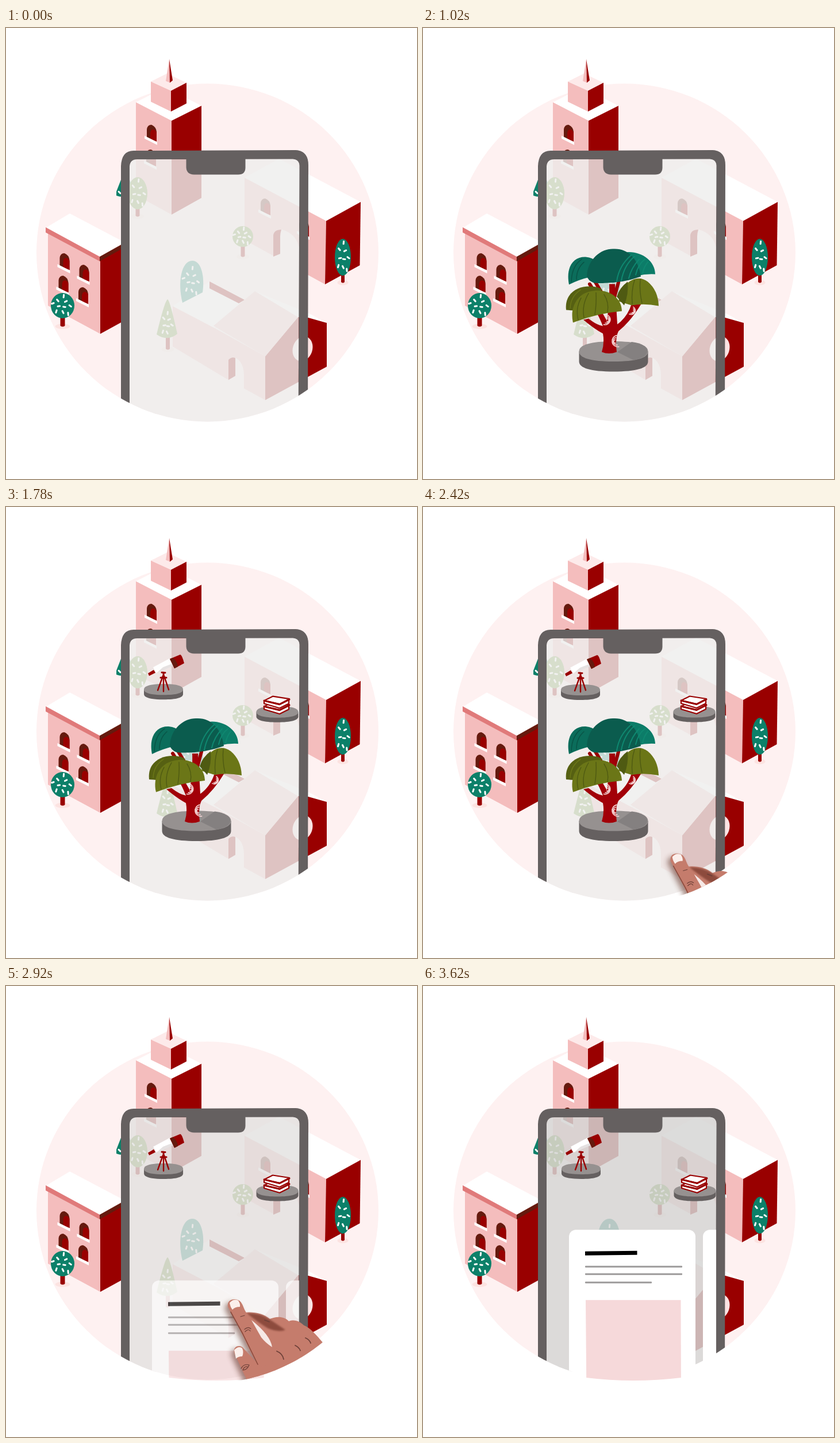
Animation, 715 px wide and 783 px high, one loop 5220 ms. Source, as an HTML page:

```html
<!DOCTYPE html>
<html lang="en">
<head>
<meta charset="utf-8">
<title>City on a phone</title>
<style>
html, body { margin: 0; width: 100%; height: 100%; overflow: hidden; background: #fff; }
svg { display: block; width: 715px; height: 783px; }
</style>
</head>
<body>
<svg id="stage" viewBox="0 0 715 783" xmlns="http://www.w3.org/2000/svg"></svg>
<script>
const RED = '#990000', PINK = '#f4bdbd', PALE = '#fef1f1', BROWN = '#651a0e';
const TEAL = '#0c8069', OLIVE = '#6e9436', GREY = '#656060', SKIN = '#c57c6c', LINE = '#6d4038';

// drawing helpers
const path = (d, fill, more = '') => `<path d="${d}" fill="${fill}" ${more}/>`;
const poly = (points, fill) => `<polygon points="${points}" fill="${fill}"/>`;
const oval = (x, y, rx, ry, fill, more = '') =>
  `<ellipse cx="${x}" cy="${y}" rx="${rx}" ry="${ry}" fill="${fill}" ${more}/>`;
const rect = (x, y, w, h, fill, more = '') =>
  `<rect x="${x}" y="${y}" width="${w}" height="${h}" fill="${fill}" ${more}/>`;
const stroke = (d, color, width) =>
  `<path d="${d}" fill="none" stroke="${color}" stroke-width="${width}" stroke-linecap="round" stroke-linejoin="round"/>`;
const group = (id, body, more = '') => `<g id="${id}" ${more}>${body}</g>`;

// short white dashes spread over a crown
function flecks(x, y, rx, ry, n) {
  let d = '';
  for (let i = 0; i < n; i++) {
    const a = i * 2.4 + .6, r = Math.sqrt((i + .4) / n) * .88, b = a + (i % 3 - 1) * .5;
    const px = x + rx * r * Math.cos(a), py = y + ry * r * Math.sin(a);
    const dx = 1.8 * Math.cos(b), dy = 2.2 * Math.sin(b);
    d += `M${px - dx},${py - dy}L${px + dx},${py + dy}`;
  }
  return stroke(d, '#fff', 3);
}

const trunk = (x, top, bottom, w) =>
  oval(x, bottom, w * 1.6, 4.5, '#fce3e1') +
  path(`M${x - w / 2},${top}H${x + w / 2}V${bottom - 1}Q${x},${bottom + 2} ${x - w / 2},${bottom - 1}Z`, RED);
const roundTree = (x, y, rx, ry, bottom, w, color, n) =>
  trunk(x, y + ry - 4, bottom, w) + oval(x, y, rx, ry, color) + flecks(x, y, rx, ry, n);

const archWindow = (x, y) => `<g transform="translate(${x} ${y})">` +
  path('M0,22V8Q1,0 8,0Q16,3 17,12V29Z', BROWN) +
  path('M6,25V14Q7,8 11,8Q16,9 17,14V29Z', RED) +
  poly('-4,19 18,30 18,35 -4,24', '#fff') + '</g>';

const tower =
  poly('226,129 277,103 340,135 288,161', '#fff') +
  poly('226,129 288,161 288,324 226,290', PINK) +
  poly('288,161 340,135 340,295 288,324', RED) +
  poly('252,93 280,79 314,95 287,109', '#fdeaea') +
  poly('252,93 287,109 287,145 252,128', PINK) +
  poly('287,109 314,95 314,131 287,145', RED) +
  poly('284,54 278,92 285,95', PINK) + poly('284,54 285,95 290,91', RED) +
  archWindow(245, 168) + archWindow(244, 211);

const leftHouse =
  poly('73,355 164,403 164,531 73,482', PINK) +
  poly('164,403 206,380 206,508 164,531', RED) +
  poly('69,347 111,322 206,372 163,397', '#fff') +
  poly('69,346 163,397 163,405 69,355', '#e07a7a') +
  poly('163,397 206,373 206,381 163,405', BROWN) +
  archWindow(93.5, 391) + archWindow(127.5, 411) + archWindow(91.5, 430) + archWindow(126, 450) +
  roundTree(98.5, 482, 20.5, 22, 518, 8, TEAL, 10);

const rightHouse =
  poly('415,260 475,227 617,302 557,335', '#fff') +
  poly('415,260 557,335 555,445 415,368', PINK) +
  poly('557,335 617,302 615.5,412 555,445', RED) +
  path('M465,397V360Q466,350 480,350Q506,357 511,385V424Z', PALE) +
  path('M465,397V360Q466,350 479,350Q477,356 477,362V392Z', RED) +
  archWindow(443, 296) + archWindow(510, 333) +
  roundTree(586, 398, 14, 32, 442, 6, TEAL, 9);

const church =
  poly('290,483 354,440 415,472 361,522', '#fff') +
  poly('354,440 415,472 405,478 354,452', RED) +
  poly('290,483 361,520 451,570 451,646 387,611 290,553', PINK) +
  poly('433,457 526,495 558,512 530,512 505,501', '#fff') +
  poly('451,570 508,502 526,503 558,512 558,588 451,646', RED) +
  poly('361,517 433,457 508,502 451,570', '#f3c6c6') +
  path('M387,611V576Q393,570 400,573Q413,580 414,602V630Z', PALE) +
  path('M387,611V576Q393,570 399,573V604Z', RED) +
  oval(516, 557, 17, 22, '#fbe3e3', 'transform="rotate(18 516 557)"');

const greens =
  path('M192,284L208,243L222,284Q208,297 192,291Z', TEAL) +
  stroke('M196,284L199,287M203,272L205,267M213,282L216,285', '#fff', 3) +
  roundTree(229, 287, 17, 28, 327, 7, OLIVE, 9) +
  roundTree(412, 362, 18, 18, 397, 7, OLIVE, 10) +
  path('M307,477C298,442 305,404 324,404C340,404 346,432 342,459Z', TEAL) + flecks(323, 440, 17, 31, 10) +
  trunk(281.5, 534, 558, 7) +
  path('M281,471Q285,472 298,531Q281,545 262,532Q276,474 281,471Z', OLIVE) + flecks(280, 515, 12, 24, 8);

// phone
const shell = 'M200,700V240Q201,213 222,213L504,212Q526,213 526,238L525,700Z';
const screen = 'M215,700V240Q216,228 228,228L499,227.5Q510,228 510.5,239L508.5,700Z';
const notch = 'M313.5,226H416.5V243Q416,254.500 404,254.500H327Q314,254 313.500,242Z';

// round plinth shared by the three objects: a squarish oval with a rim
const halfOval = (x, rx, ry, k = .66) =>
  `c0,${-ry * k} ${-rx + rx * k},${-ry} ${-rx},${-ry}s${-rx},${ry - ry * k} ${-rx},${ry}`;
const lowerHalf = (rx, ry) => halfOval(0, -rx, -ry);
const plinth = (x, y, rx, ry, h) =>
  path(`M${x - rx},${y}v${h}${lowerHalf(rx, ry)}v${-h}z`, GREY) +
  path(`M${x - rx},${y}${lowerHalf(rx, ry)}${halfOval(0, rx, ry)}z`, '#969190');

const rings = (x, y, r, turn) => `<g transform="translate(${x} ${y}) rotate(${turn})">` +
  [1, .65, .3].map(k => stroke(`M${-r * .6 * k},${-r * k}A${r * k},${r * k} 0 1 1 ${-r * .6 * k},${r * k}`, '#f6d6d6', 1.6)).join('') + '</g>';

const bigTree =
  plinth(331.5, 545, 60, 17.5, 17.5) +
  path('M338,546L363,528.500Q390,532 390.500,545Q389,556 366,560Z', '#848080') +
  stroke('M290,428L313,465M300,425L322,462M340,425L330,462', RED, 6) +
  path('M254,429C248,398 262,380 283,381Q296,382 302,390L290,416Q272,420 254,429Z', '#0b6d5b') +
  path('M346,374C374,367 404,385 404,411Q388,410 372,414Z', '#0c7c68') +
  path('M285,414C287,383 311,366 332,367C356,366 375,384 379,415Q340,429 297,426Q287,422 285,414Z', '#0b5c4e') +
  stroke('M368,380Q350,395 345,422M362,378Q341,396 337,423M376,385Q362,400 358,418M386,385Q374,394 370,412M391,390Q384,398 382,410', '#0f8870', 2) +
  stroke('M258,424Q259,396 276,385M267,420Q267,401 280,390', '#095446', 1.5) +
  path('M311,546Q316,530 313,514Q298,506 279,490L288,488Q302,499 313,501Q306,484 303,480L312,478L320,492Q325,450 324,428H334L338,498Q356,485 363,462H380Q362,492 340,510Q334,522 337,546Q323,551 311,546Z', '#a20008') +
  rings(322, 491, 9, 15) + rings(366, 476, 7, 30) + rings(333, 528, 10, 170) +
  path('M340,458Q346,428 366,420Q379,415 391,424Q409,439 410,466Q385,461 363,465Z', '#6b7617') +
  path('M337,450Q342,434 356,424Q358,446 350,465Z', '#4f5a12') +
  stroke('M368,421Q362,440 364,463M378,420Q376,440 381,461', '#4f5a12', 1.4) +
  path('M249,473C246,446 266,432 290,432Q306,432 312,438L262,474Z', '#566012') +
  path('M261,495C255,469 268,446 290,441C322,433 346,452 346,475Q302,479 261,495Z', '#6b7617') +
  stroke('M275,452Q265,470 270,490M288,444Q276,464 280,486M301,443Q302,462 299,481M315,446Q324,460 321,477', '#4f5a12', 1.4) +
  stroke('M256,470Q257,449 274,438', '#6b7617', 1.5);

const telescope =
  plinth(274, 317.5, 34, 9.5, 8) +
  stroke('M273,294L264,319M274,294V321M275,294L283,318', RED, 2.4) +
  stroke('M269,297H279M271,288L277,288.500M274,288V295', RED, 3) +
  poly('247,289.500 257,283.500 260,288.500 249,294', RED) +
  poly('256,279 285,263.500 292,275 261,289', '#fff') +
  poly('273,279 291,272 292,276 262,289', '#e5e1e1') +
  path('M285,264.500L303,257Q306,257 310,272L293,281Z', RED) +
  path('M285,264.500L290,262.500Q298,268 299,278L293,281Z', BROWN);

const outline = `stroke="${RED}" stroke-width="2.2" stroke-linejoin="round"`;
const book = y => `<g transform="translate(0 ${y})">` +
  path('M449,336V341L476,349L492,341V334L476,342.500Z', '#fff', outline) +
  path('M449,336L464,328.500L493,333L476,342Z', '#fff', outline) +
  stroke('M449,336L476,342.500L493,334', RED, 3) + '</g>';
const books = plinth(472, 355.5, 36.5, 10, 8) + book(10) + book(0);

// info card, drawn at its resting place
const bar = (y, w) => rect(282, y, w, 3, '#9d9b9b', 'rx="1"');
const card =
  rect(254, 423, 220, 400, '#fff', 'rx="12"') + rect(487, 423, 60, 400, '#fff', 'rx="12"') +
  poly('282,460.500 372.500,459.500 372.500,466.500 282,467.500', '#000') +
  bar(485.5, 169) + bar(498.5, 169) + bar(513, 116) +
  path('M283,545H448.500L449,720H284.500Z', '#f6d9da');

// hand, drawn at the tapping place
const finger = 'M386,557C384,546 394,542 403,545C410,547 412,555 415,562L466,655L440,662Q432,648 425,634L410,603Z';
const thumb = 'M397,637C394,625 408,621 414,630L442,660L440,720H432L417,680Z';
const palm = 'M413,567C430,565 447,568 459,578C470,573 484,573 492,582C503,578 512,583 518,589C530,594 538,604 552,620V720H425L440,658Z';
const hand =
  `<g filter="url(#soft)" opacity=".55" transform="translate(-5 5)">${path(finger, '#5e2d23')}${path(thumb, '#5e2d23')}</g>` +
  path(palm, SKIN) +
  path('M419,568Q442,567 459,579L486,597Q474,602 455,594Q437,583 419,568Z', '#8d4c3e', 'filter="url(#blend)"') +
  path('M427,580Q460,606 463,627Q452,620 444,610Z', '#f6e9e6') +
  path(thumb, SKIN) + path(finger, SKIN) +
  stroke('M391,566L412,604L438,657', '#8a4a3c', 1.6) +
  path('M389,550Q396,542 404,546Q408,552 407,557Q398,557 394,562Q390,557 389,550Z', '#fbefeb') +
  path('M397,632Q405,624 411,629Q414,636 411,643Q404,643 400,647Z', '#fbefeb') +
  stroke('M408,574L415,572M415,596Q421,591 426,595M416,600Q422,594 425,599M409,664Q414,655 423,658Q420,666 412,667Q414,660 420,661', LINE, 1.2) +
  stroke('M450,580L458,583M471,634Q481,638 483,648M503,624Q510,627 512,633M521,611Q528,614 530,620', LINE, 1.8);

document.getElementById('stage').innerHTML =
  `<defs>
    <clipPath id="disc"><ellipse cx="350.500" cy="390" rx="297.500" ry="293.500"/></clipPath>
    <clipPath id="reach"><ellipse cx="350" cy="390" rx="310" ry="300"/></clipPath>
    <clipPath id="view"><path d="M215,228H510V680H449Q366,690 284,680L255,668L215,650Z"/></clipPath>
    <filter id="soft" x="-50%" y="-50%" width="200%" height="200%"><feGaussianBlur stdDeviation="5"/></filter>
    <filter id="blend" x="-20%" y="-20%" width="140%" height="140%"><feGaussianBlur stdDeviation="1.5"/></filter>
  </defs>` +
  oval(350.5, 390, 297.5, 293.5, PALE) +
  tower + leftHouse + rightHouse + church + greens +
  `<g clip-path="url(#disc)">` +
    path(screen, '#eeeeed', 'opacity=".82"') +
    group('shade', path(screen, GREY)) +
    path(shell + screen, GREY, 'fill-rule="evenodd"') + path(notch, GREY) +
  '</g>' +
  group('telescope', telescope) + group('books', books) + group('tree', bigTree) +
  `<g clip-path="url(#view)">${group('card', card)}</g>` +
  `<g clip-path="url(#reach)">${group('hand', hand)}</g>`;

// motion
const LOOP = 5220;
const part = id => document.getElementById(id);
const parts = Object.fromEntries(['shade', 'telescope', 'books', 'tree', 'card', 'hand'].map(id => [id, part(id)]));
const ramp = (t, from, to) => Math.min(1, Math.max(0, (t - from) / (to - from)));

function spring(ms) {
  if (ms <= 0) return 0;
  const damp = .52, w = 16 * ms / 1000, root = Math.sqrt(1 - damp * damp);
  return 1 - Math.exp(-damp * w) * (Math.cos(root * w) + damp / root * Math.sin(root * w));
}

function place(el, x, y, opacity) {
  el.setAttribute('transform', `translate(${x.toFixed(2)} ${y.toFixed(2)})`);
  el.setAttribute('opacity', opacity.toFixed(3));
}

function drop(el, t, start, height, fade = 1, x = 0) {
  const s = spring(t - start);
  place(el, x, (s - 1) * height, s < .1 ? 0 : Math.min(1, s) * fade);
}

function draw(t) {
  const nudge = ramp(t, 2900, 3300);
  drop(parts.tree, t, 820, 128, 1 - ramp(t, 2680, 2860));
  drop(parts.books, t, 1100, 58, 1, nudge);
  drop(parts.telescope, t, 1253, 57, 1, nudge);

  const rise = t < 2780 ? 0 : 1 - Math.exp(-(t - 2780) / 126);
  place(parts.card, 0, 270 * (1 - rise), t >= 3620 ? 1 : rise);
  place(parts.shade, 0, 0, .145 * ramp(t, 2780, 3090));

  const away = t < 2900 ? (1 - ramp(t, 2240, 2780)) ** 2 : ramp(t, 2950, 3310) ** 2;
  place(parts.hand, 101 * away, 130 * away, away < 1 ? 1 : 0);
}

const begin = performance.now();
function tick() {
  draw((performance.now() - begin) % LOOP);
  requestAnimationFrame(tick);
}
tick();
</script>
</body>
</html>
```
